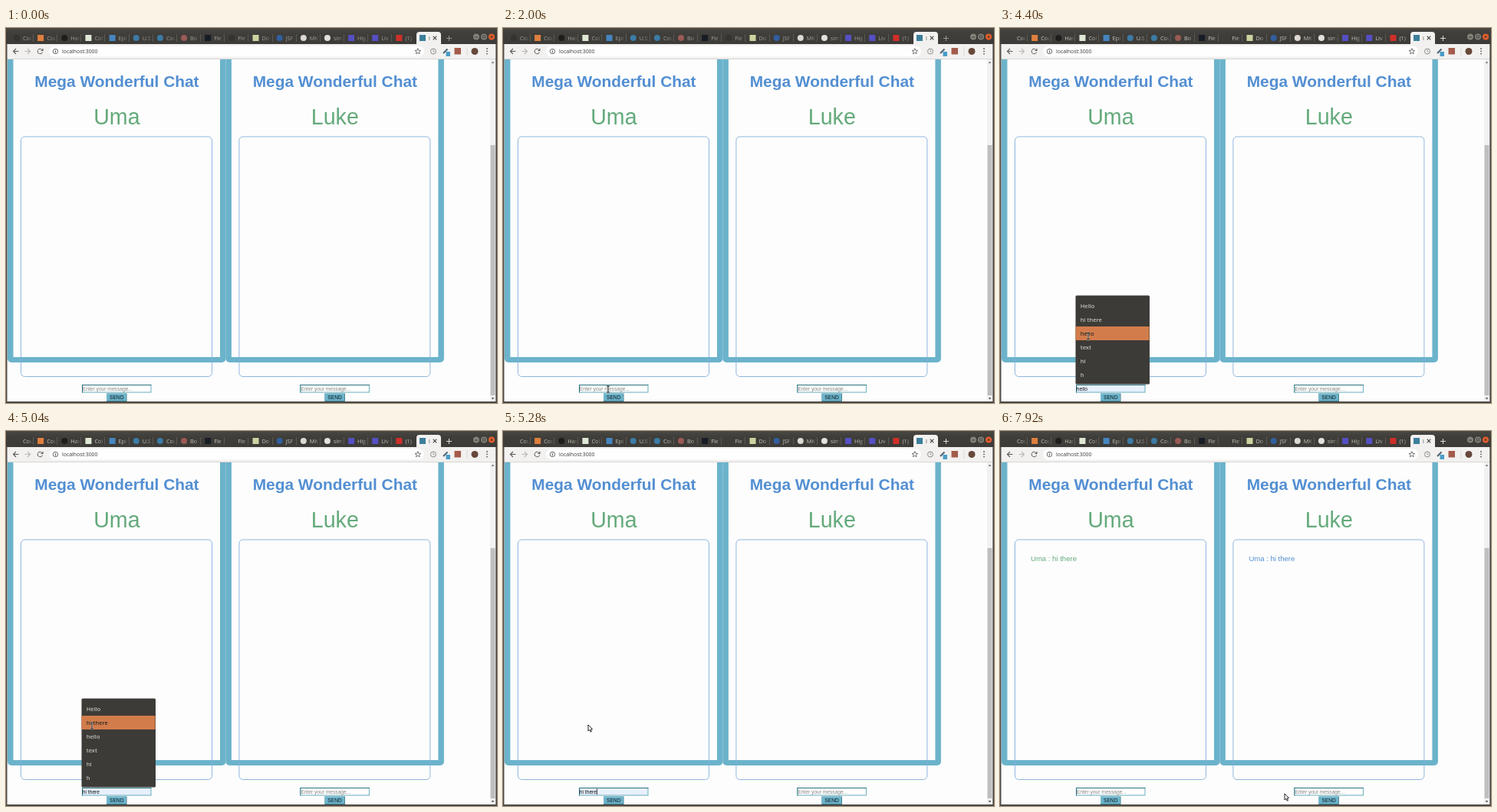
An HTML page with a canvas that plays this animation: 640 by 490 pixels, repeating every 8 s.

```html
<!DOCTYPE html>
<html lang="en">
<head>
<meta charset="utf-8">
<title>Chat demo</title>
<style>
html, body { margin: 0; width: 100%; height: 100%; overflow: hidden; background: #fdfdfd; }
canvas { display: block; width: 640px; height: 490px; }
</style>
</head>
<body>
<canvas id="stage" width="640" height="490"></canvas>
<script>
const ctx = document.getElementById('stage').getContext('2d');
const LOOP = 8000, STEP = 80;
const FOCUS = 2960, PICKED = 5200, PRESSED = 6480, SENT = 6880;
const TEAL = '#6bb3cb', BLUE = '#538fd2', GREEN = '#64aa7b';
const SANS = '"Liberation Sans", Arial, sans-serif';
const UI = '"Open Sans", "Noto Sans", sans-serif';
const TITLE = 'Mega Wonderful Chat';
const USERS = ['Uma', 'Luke'];
const PANEL_GAP = 284.4;
const OPTIONS = ['Hello', 'hi there', 'hello', 'text', 'hi', 'h'];

// Tab label, icon colour, icon shape
const TABS = [
  ['Cou', '#34332f', 'o'], ['Cou', '#df7f3e', 's'], ['Has', '#1d1d1c', 'o'], ['Col', '#dfe8d5', 's'],
  ['Epi', '#4585c0', 's'], ['U.S.', '#3c7ba6', 'o'], ['Cou', '#3c7ba6', 'o'], ['Bo', '#9b5a55', 'o'],
  ['Fle', '#171c25', 's'], ['Fle', '#34332f', 'o'], ['Do', '#cfd3a0', 's'], ['JSF', '#315f9f', 'o'],
  ['MK', '#ded8d2', 'o'], ['sim', '#e3e1dc', 'o'], ['Hig', '#554fc4', 's'], ['Liv', '#554fc4', 's'],
  ['(1)', '#cf2f28', 's']
];

// Pointer track: time, x, y
const TRACK = [
  [1440, 148, 492], [1840, 138, 474], [2000, 137, 472], [2160, 132, 470],
  [3760, 132, 470], [4240, 118, 420], [4560, 112, 385], [5120, 112, 385],
  [5200, 111, 384], [5280, 111, 384], [5520, 117, 426], [6000, 139, 462],
  [6400, 152, 482], [7280, 152, 482], [7520, 150, 493],
  [7600, 332, 493], [7680, 336, 484], [7920, 371, 474], [8000, 371, 474]
];

function pointer(t) {
  const i = TRACK.findIndex(k => k[0] > t);
  if (i < 1) return null;
  const [t0, x0, y0] = TRACK[i - 1], [t1, x1, y1] = TRACK[i];
  const p = (t - t0) / (t1 - t0);
  return { x: x0 + (x1 - x0) * p, y: y0 + (y1 - y0) * p };
}

const inside = (p, x, y, w, h) => !!p && p.x >= x && p.x < x + w && p.y >= y && p.y < y + h;

function rect(x, y, w, h, color) {
  ctx.fillStyle = color;
  ctx.fillRect(x, y, w, h);
}

function round(x, y, w, h, r, color) {
  ctx.fillStyle = color;
  ctx.beginPath();
  ctx.roundRect(x, y, w, h, r);
  ctx.fill();
}

function disc(x, y, r, color) {
  ctx.fillStyle = color;
  ctx.beginPath();
  ctx.arc(x, y, r, 0, Math.PI * 2);
  ctx.fill();
}

function ring(x, y, r, color, from = 0, to = Math.PI * 2) {
  ctx.strokeStyle = color;
  ctx.lineWidth = 1;
  ctx.beginPath();
  ctx.arc(x, y, r, from, to);
  ctx.stroke();
}

function line(color, width, ...pts) {
  ctx.strokeStyle = color;
  ctx.lineWidth = width;
  ctx.beginPath();
  pts.forEach(([x, y], i) => i ? ctx.lineTo(x, y) : ctx.moveTo(x, y));
  ctx.stroke();
}

function poly(color, ...pts) {
  ctx.fillStyle = color;
  ctx.beginPath();
  pts.forEach(([x, y]) => ctx.lineTo(x, y));
  ctx.closePath();
  ctx.fill();
}

function text(str, x, y, font, color, align = 'left') {
  ctx.font = font;
  ctx.fillStyle = color;
  ctx.textAlign = align;
  ctx.fillText(str, x, y);
}

function tabBar(focused) {
  const bar = ctx.createLinearGradient(0, 0, 0, 21);
  bar.addColorStop(0, '#4a4843');
  bar.addColorStop(0.35, '#403e3a');
  bar.addColorStop(1, '#3c3b37');
  rect(0, 0, 640, 22, bar);

  TABS.forEach(([label, color, shape], i) => {
    const x = 14 + i * 31.15;
    const faint = color === '#34332f';
    if (!faint || !focused) {
      if (shape === 'o') disc(x, 13, 4, color);
      else rect(x - 4, 9, 8, 8, color);
    }
    const fade = ctx.createLinearGradient(x + 14, 0, x + 20, 0);
    fade.addColorStop(0, focused ? '#c9c5bd' : '#a09d96');
    fade.addColorStop(1, '#55534e');
    ctx.save();
    ctx.beginPath();
    ctx.rect(x + 7, 5, 13, 15);
    ctx.clip();
    text(label, x + 8, 15.6, '7.3px ' + UI, fade);
    ctx.restore();
    if (i < TABS.length - 1) rect(Math.round(x + 21), 8, 1, 10, '#5b5954');
  });

  round(535, 5, 32, 18, [4, 4, 0, 0], '#f2f1f0');
  rect(539, 9, 8, 8, '#3c7f9c');
  text('l', 551, 15.6, '7.3px ' + UI, '#55534f');
  line('#45433f', 1.1, [556.7, 10.7], [561.3, 15.3]);
  line('#45433f', 1.1, [561.3, 10.7], [556.7, 15.3]);
  const plus = focused ? '#dedbd4' : '#98958e';
  line(plus, 1, [574, 13.5], [581, 13.5]);
  line(plus, 1, [577.5, 10], [577.5, 17]);

  disc(613, 11.5, 4, '#85827a');
  disc(623, 11.5, 4, '#85827a');
  disc(633, 11.5, 4, '#e4602f');
  line('#3b3a36', 1, [611, 12], [615, 12]);
  ctx.lineWidth = 0.8;
  ctx.strokeRect(621.3, 10, 3.4, 3);
  line('#4a2a1c', 1, [631.5, 10], [634.5, 13]);
  line('#4a2a1c', 1, [634.5, 10], [631.5, 13]);
}

function toolbar() {
  rect(1, 21, 638, 20, '#f2f1f0');
  round(56, 23.5, 489, 14, 7, '#fefefe');
  rect(1, 40, 638, 1, '#d6d5d3');

  line('#5b5b5b', 1.1, [16.5, 30.5], [9.5, 30.5]);
  line('#5b5b5b', 1.1, [13, 27], [9.5, 30.5], [13, 34]);
  line('#b9b8b6', 1.1, [24.5, 30.5], [31.5, 30.5]);
  line('#b9b8b6', 1.1, [28, 27], [31.5, 30.5], [28, 34]);
  ring(44.5, 30.5, 3.2, '#5b5b5b', 0.3, 5.4);
  poly('#5b5b5b', [48.5, 26.5], [48.5, 30], [45, 30]);

  ring(64.5, 30.5, 3.2, '#666');
  rect(64, 30, 1, 2.4, '#666');
  rect(64, 28.4, 1, 1, '#666');
  text('localhost:3000', 73, 33, '6.9px ' + UI, '#3a3a3a');

  ctx.strokeStyle = '#686868';
  ctx.lineWidth = 0.9;
  ctx.beginPath();
  for (let i = 0; i < 10; i++) {
    const r = i % 2 ? 1.7 : 4, a = -Math.PI / 2 + i * Math.PI / 5;
    ctx.lineTo(536.8 + r * Math.cos(a), 30.6 + r * Math.sin(a));
  }
  ctx.closePath();
  ctx.stroke();

  ring(557, 30.5, 3.5, '#8b8b8b');
  line('#8b8b8b', 0.8, [557, 28.5], [557, 30.8], [558.7, 30.8]);
  line('#526675', 2.2, [570, 33], [575.5, 27.5]);
  rect(573.5, 31, 5.5, 6, '#4a9cc7');
  rect(584.5, 26, 8.5, 8.5, '#a45b4b');
  rect(600.5, 25, 1, 11, '#dad9d7');
  disc(611, 30.5, 4.5, '#67483a');
  [27, 30.3, 33.6].forEach(y => disc(627, y, 0.9, '#555'));
}

function scrollbar() {
  rect(631, 41, 7, 447, '#f1f1f1');
  rect(631.5, 153, 6, 327, '#bfbfbf');
  poly('#777', [632.7, 46], [636.3, 46], [634.5, 43.5]);
  poly('#555', [632.7, 483], [636.3, 483], [634.5, 485.5]);
}

function chat(i, field, hover, sent) {
  ctx.save();
  ctx.translate(i * PANEL_GAP, 0);
  round(2, 36, 284.5, 401, 5, TEAL);
  rect(9.5, 41, 269.5, 389, '#fdfdfd');

  text(TITLE, 144.4, 77, 'bold 20.9px ' + SANS, BLUE, 'center');
  text(USERS[i], 144.4, 126, '28.6px ' + SANS, GREEN, 'center');

  ctx.strokeStyle = '#83afdc';
  ctx.lineWidth = 0.9;
  ctx.beginPath();
  ctx.roundRect(19.5, 142, 249, 313.5, 5);
  ctx.stroke();
  if (sent) text(USERS[0] + ' : hi there', 40, 170.3, '9.56px ' + SANS, i ? BLUE : GREEN);

  rect(99, 466, 90.5, 10.5, '#67aebb');
  rect(99, 466, 90.5, 1, '#28717d');
  rect(99, 466, 1, 10.5, '#28717d');
  rect(100, 467, 88.5, 8.5, field.value ? '#e8f0fe' : '#ffffff');
  text(field.value || 'Enter your message...', 99.8, 473.6, '6.67px ' + SANS, field.value ? '#111' : '#858585');
  if (field.caret) rect(field.value ? 122 : 100, 467.5, 0.8, 7.5, '#111');

  rect(131, 477.5, 26.5, 10.5, '#35707f');
  rect(131, 477.5, 25.7, 9.6, '#83c1d4');
  rect(131.8, 478.3, 24.8, 8.8, hover ? BLUE : TEAL);
  text('SEND', 144.2, 485.2, '6.67px ' + SANS, '#0d1b20', 'center');
  ctx.restore();
}

function popup(active) {
  round(98.5, 349.5, 96.5, 116, 1.5, '#3d3b37');
  OPTIONS.forEach((label, i) => {
    const on = i === active;
    if (on) rect(98.5, 354 + i * 18, 96, 18, '#d27c4b');
    text(label, 104.7, 365.8 + i * 18, '600 7.5px ' + UI, on ? '#352b25' : '#c3c0b9');
  });
}

function beam({ x, y }) {
  for (const [color, w] of [['#ffffffaa', 2.2], ['#111', 1]]) {
    line(color, w, [x, y - 4], [x, y + 4]);
    line(color, w, [x - 2, y - 4], [x + 2, y - 4]);
    line(color, w, [x - 2, y + 4], [x + 2, y + 4]);
  }
}

function arrow({ x, y }) {
  ctx.save();
  ctx.translate(x, y);
  const shape = [[0, 0], [0, 8], [1.8, 6.4], [3.1, 9.2], [4.5, 8.6], [3.2, 5.9], [5.6, 5.7]];
  poly('#fff', ...shape);
  line('#111', 0.9, ...shape, [0, 0], [0, 1]);
  ctx.restore();
}

function draw(t) {
  const p = pointer(t);
  const open = t >= FOCUS && t < PICKED;
  const active = open && inside(p, 98, 354, 97, 108) ? Math.floor((p.y - 354) / 18) : -1;
  const preview = active >= 0 ? OPTIONS[active] : '';
  const picked = t >= PICKED && t < SENT;
  const blink = start => (t - start) % 1000 < 500;
  const field = {
    value: picked ? 'hi there' : preview,
    caret: open ? active < 0 && blink(FOCUS) : picked && t < PRESSED && blink(PICKED)
  };
  const hover = inside(p, 131, 477, 27, 11);

  rect(0, 0, 640, 490, '#fdfdfd');
  chat(0, field, hover, t >= SENT);
  chat(1, { value: '', caret: false }, false, t >= SENT);
  scrollbar();
  tabBar(t >= FOCUS);
  toolbar();
  rect(0, 21, 1.5, 469, '#4a4945');
  rect(638.3, 21, 1.7, 469, '#4a4945');
  rect(0, 488, 640, 2, '#4a4945');
  if (open) popup(active);
  if (p) (active >= 0 || inside(p, 99, 466, 91, 11) ? beam : arrow)(p);
}

const start = performance.now();
function tick() {
  const t = (performance.now() - start) % LOOP;
  draw(Math.floor(t / STEP) * STEP);
  requestAnimationFrame(tick);
}
tick();
</script>
</body>
</html>
```
